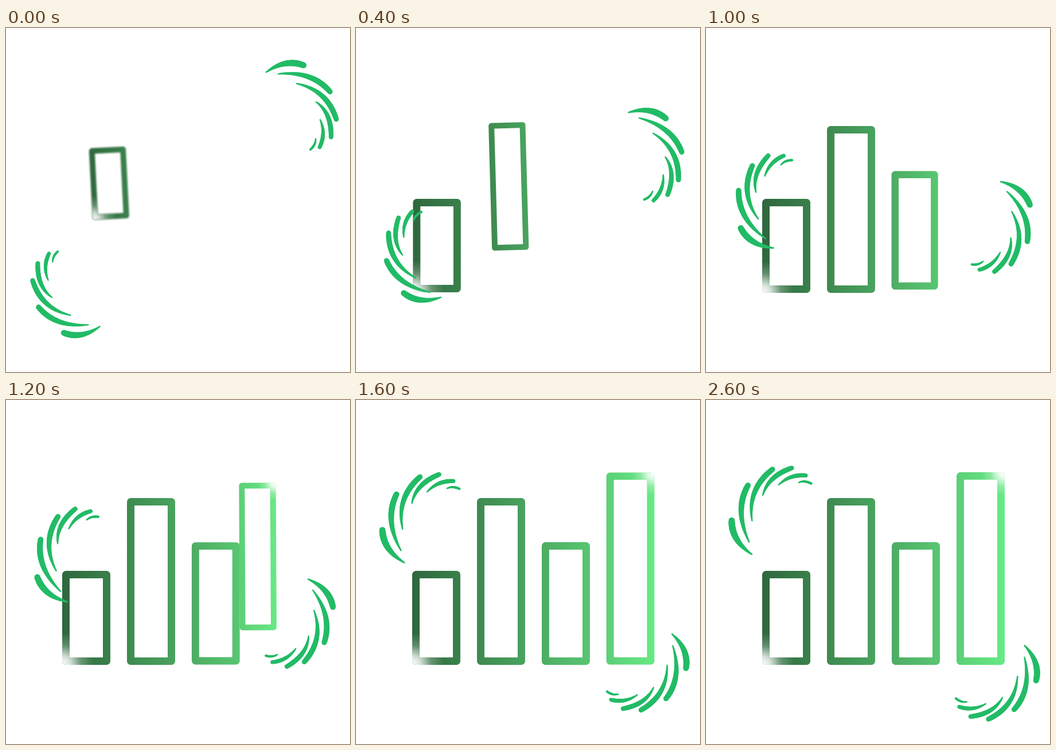
Recreate the animation shown at these times as an HTML page with a canvas. Size 600 px wide and 600 px high, loop 2.7 s.

```html
<!DOCTYPE html>
<html lang="en">
<head>
<meta charset="utf-8">
<title>Bar chart</title>
<style>
  html, body { margin: 0; width: 100%; height: 100%; overflow: hidden; background: #fff; }
  canvas { display: block; }
</style>
</head>
<body>
<canvas id="stage" width="600" height="600"></canvas>
<script>
const ctx = document.getElementById('stage').getContext('2d');
const LOOP = 2700, STEP = 100;
const STAGGER = 370;      // delay between two bars
const SPIN_END = 1680;    // the bursts come to rest here
const CENTER = { x: 309.5, y: 294 };
const BOTTOM = 462, BAR_WIDTH = 84, LINE = 13;

const bars = [
  { x: 98, top: 298 },
  { x: 211, top: 171 },
  { x: 324, top: 248 },
  { x: 437, top: 126 },
];

// Tapered strokes around the burst pivot: tip, control, thick end, width
const strokes = [
  [-57, -52, -23.5, -76, 8, -64, 11],
  [-36, -49, 23, -54.5, 54, -18, 10],
  [-4, -32, 49, -21, 65, 30, 9.5],
  [30, 0, 57, 19, 56, 61, 8.5],
  [37, 31, 47.5, 55, 36, 79, 7],
  [29, 64, 29.5, 74.5, 20, 83, 4],
];

const bursts = [
  { from: [511, 129], to: [513, 490], angle: 0, turn: 82.2, scale: [1, 0.973] },
  { from: [109, 470], to: [110, 195], angle: 180.5, turn: 69.3, scale: [0.965, 1.037] },
];

const lerp = (a, b, u) => a + (b - a) * u;
const clamp = u => Math.min(1, Math.max(0, u));
const rad = degrees => degrees * Math.PI / 180;

// Interpolates [time, value] keys
function track(keys, t) {
  if (t <= keys[0][0]) return keys[0][1];
  for (let i = 1; i < keys.length; i++) {
    const [t0, a] = keys[i - 1], [t1, b] = keys[i];
    if (t < t1) return lerp(a, b, (t - t0) / (t1 - t0));
  }
  return keys[keys.length - 1][1];
}

const dropKeys = [[-110, -232], [-70, -180], [0, -89], [30, -35], [90, -21], [190, 0]];
const tiltKeys = [[-70, -5], [0, -2.9], [30, -1.6], [90, -0.3], [130, 0]];
const blurKeys = [[-70, 5], [0, 1.7], [30, 0.5], [60, 0]];

const green = ctx.createLinearGradient(98, 0, 521, 0);
green.addColorStop(0, '#2f673d');
green.addColorStop(1, '#67e985');

function glow(x, y, radius) {
  const g = ctx.createRadialGradient(x, y, 0, x, y, radius);
  g.addColorStop(0, 'rgba(255,255,255,1)');
  g.addColorStop(0.25, 'rgba(255,255,255,.8)');
  g.addColorStop(0.6, 'rgba(255,255,255,.25)');
  g.addColorStop(1, 'rgba(255,255,255,0)');
  return g;
}
const glows = { 0: glow(99, 461, 54), 3: glow(520, 127, 40) };

function drawBar({ x, top }, index, t) {
  const time = t - index * STAGGER;
  if (time < -100) return;
  const scale = 1 - 0.235 * Math.exp(-Math.max(0, time - 95) / 85);
  const cx = x + BAR_WIDTH / 2, cy = (top + BOTTOM) / 2;
  const blur = track(blurKeys, time);
  ctx.save();
  ctx.globalAlpha = clamp((time + 100) / 60);
  if (blur > 0) ctx.filter = `blur(${blur}px)`;
  ctx.translate(lerp(CENTER.x, cx, scale), lerp(CENTER.y, cy, scale) + track(dropKeys, time));
  ctx.rotate(rad(track(tiltKeys, time)));
  ctx.scale(scale, scale);
  ctx.translate(-cx, -cy);
  ctx.lineWidth = LINE;
  ctx.lineJoin = 'round';
  for (const paint of [green, glows[index]]) {
    if (!paint) continue;
    ctx.strokeStyle = paint;
    ctx.strokeRect(x + LINE / 2, top + LINE / 2, BAR_WIDTH - LINE, BOTTOM - top - LINE);
  }
  ctx.restore();
}

function drawStroke([x0, y0, x1, y1, x2, y2, width]) {
  const N = 28;
  const at = (a, b, c, u) => lerp(lerp(a, b, u), lerp(b, c, u), u);
  for (let i = 0; i < N; i++) {
    const u = i / N, v = (i + 1) / N;
    ctx.lineWidth = 2 + (width - 2) * Math.sin(v * 0.62 * Math.PI);
    ctx.beginPath();
    ctx.moveTo(at(x0, x1, x2, u), at(y0, y1, y2, u));
    ctx.lineTo(at(x0, x1, x2, v), at(y0, y1, y2, v));
    ctx.stroke();
  }
}

function drawBurst({ from, to, angle, turn, scale }, t) {
  const u = clamp(t / SPIN_END);
  const size = lerp(scale[0], scale[1], u);
  ctx.save();
  ctx.translate(lerp(from[0], to[0], u), lerp(from[1], to[1], u));
  ctx.rotate(rad(angle + turn * u));
  ctx.scale(size, size);
  ctx.strokeStyle = '#22bb66';
  ctx.lineCap = 'round';
  strokes.forEach(drawStroke);
  ctx.restore();
}

function frame() {
  const t = Math.floor(performance.now() % LOOP / STEP) * STEP;
  ctx.fillStyle = '#fff';
  ctx.fillRect(0, 0, 600, 600);
  bars.forEach((bar, i) => drawBar(bar, i, t));
  bursts.forEach(burst => drawBurst(burst, t));
  requestAnimationFrame(frame);
}
frame();
</script>
</body>
</html>
```
